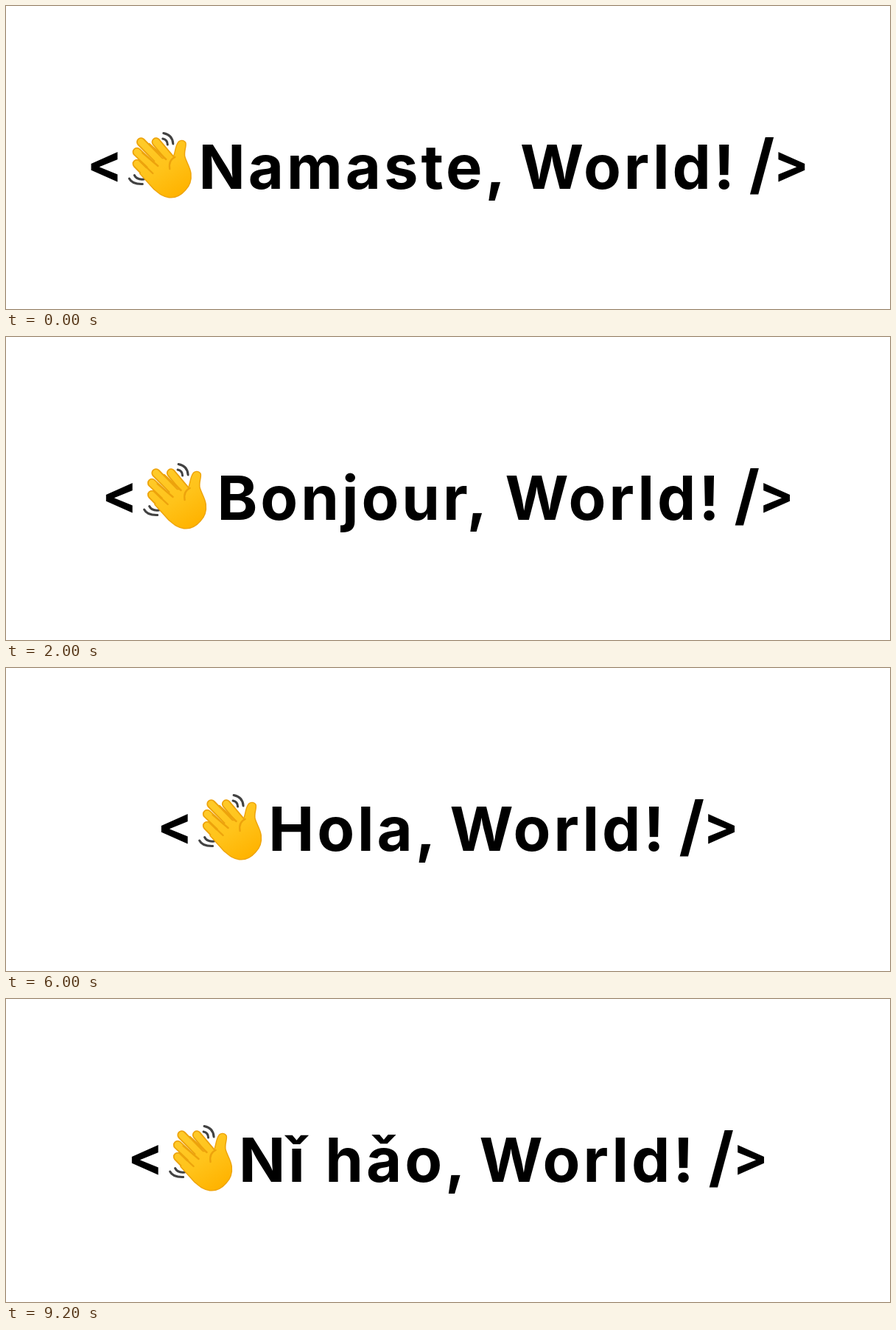
Animation of 1200x411 px, one loop 10 s. Source, as an HTML page with a canvas:

```html
<!DOCTYPE html>
<html lang="en">
<head>
<meta charset="utf-8">
<title>Hello, World!</title>
<style>
  html, body { margin: 0; width: 100%; height: 100%; overflow: hidden; background: #fff; }
  canvas { display: block; }
</style>
</head>
<body>
<canvas id="stage" width="1200" height="411"></canvas>
<script>
const ctx = document.getElementById('stage').getContext('2d');
const HOLD = 2000, MIDDLE = 600, BASELINE = 247.5;

// Each greeting with half the width of the whole line.
const greetings = [
  ['Namaste,', 487.3],
  ['Bonjour,', 467],
  ['Ciao,', 389],
  ['Hola,', 392],
  ['Nǐ hǎo,', 432]
];

const palm = new Path2D(`M227 206 C230 200 230 192 233 187 C235 182 241 182 243 186
  C244 191 240 198 242 205 C244 212 249 219 250 227 C251 236 249 243 243 249
  C236 257 229 260 221 259 C212 258 207 253 201 248 L182 227 L205 208 Z`);
const fingers = [
  new Path2D('M203.5 184.5 L225 210'),
  new Path2D('M183 184.5 L213 215'),
  new Path2D('M177.5 198 L207 226'),
  new Path2D('M177.5 214 L203 240')
];
const creases = new Path2D(`M194 187 L217 208 M185 199 L206 217 M180 209 L199 227
  M229 205 Q220 209 222 221`);
const waves = new Path2D(`M213.5 172.5 Q226 175 226.5 187 M212.5 180 Q219 181.5 219 188
  M167 234 Q171 242 185 241.5 M174 229.5 Q177 236 187 235`);

function stroke(path, color, width) {
  ctx.strokeStyle = color;
  ctx.lineWidth = width;
  ctx.stroke(path);
}

function silhouette(color, shrink) {
  for (const finger of fingers) stroke(finger, color, 12.5 - shrink);
  ctx.fillStyle = color;
  ctx.fill(palm);
}

function drawHand(dx) {
  const skin = ctx.createLinearGradient(190, 185, 235, 255);
  skin.addColorStop(0, '#ffca28');
  skin.addColorStop(0.5, '#ffc31a');
  skin.addColorStop(1, '#ffb300');

  ctx.save();
  ctx.translate(dx, 0);
  ctx.lineCap = ctx.lineJoin = 'round';
  stroke(waves, '#424242', 3);
  stroke(palm, '#eda30c', 2.8);
  silhouette('#eda30c', 0);
  silhouette(skin, 3.6);
  stroke(creases, '#eda30c', 2.4);
  ctx.restore();
}

// Centres the visible ink of a piece of text on cx.
function put(text, cx, size, baseline, tracking = 0) {
  ctx.font = `700 ${size}px Inter, sans-serif`;
  ctx.letterSpacing = tracking + 'px';
  const ink = ctx.measureText(text);
  const shift = (ink.actualBoundingBoxRight - ink.actualBoundingBoxLeft) / 2;
  ctx.fillText(text, cx - shift, baseline);
}

const putWord = (text, cx) => put(text, cx, 83, BASELINE, 4);
const putAngle = (text, cx) => put(text, cx, 72, BASELINE - 9);

function draw(now) {
  const [greeting, half] = greetings[Math.floor(now / HOLD) % greetings.length];
  const left = MIDDLE - half, right = MIDDLE + half;

  ctx.fillStyle = '#fff';
  ctx.fillRect(0, 0, 1200, 411);
  drawHand(left - 112.4);

  ctx.fillStyle = '#000';
  putAngle('<', left + 20.5);
  putWord(greeting, 469);
  putWord('World!', right - 246.5);
  put('/', right - 61, 89, BASELINE - 2);
  putAngle('>', right - 20.5);
}

const start = performance.now();
function tick() {
  draw(performance.now() - start);
  requestAnimationFrame(tick);
}
tick();
</script>
</body>
</html>
```
